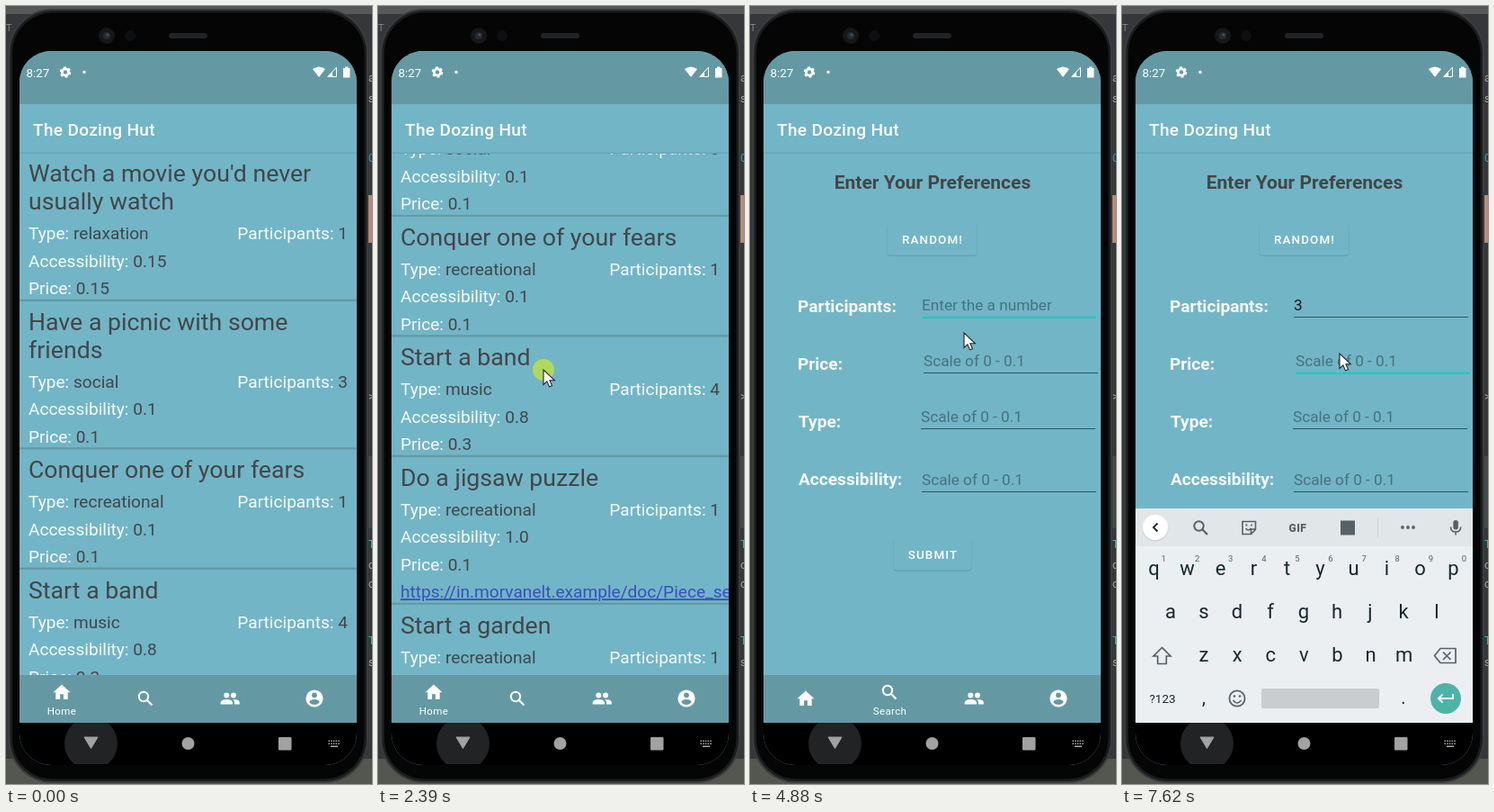
Recreate the animation shown at these times as an HTML page. Size 407 by 864 pixels, loop 8 s.

```html
<!DOCTYPE html>
<html lang="en">
<head>
<meta charset="utf-8">
<title>Activity app demo</title>
<style>
  html, body { margin: 0; width: 100%; height: 100%; overflow: hidden; background: #303234; }
  svg { display: block; width: 100vw; height: 100vh; font-family: Roboto, sans-serif; }
  text { white-space: pre; }
</style>
</head>
<body>
<svg id="stage" viewBox="0 0 407 864"></svg>
<script>
const LOOP = 8000, FPS = 15;
const BLUE = '#72b5c6', BAR = '#6499a3', DARK = '#434648', KEY = '#17272e', GREY = '#566268';

// Markup helpers
const text = (x, y, size, fill, str, attrs = '') =>
  `<text x="${x}" y="${y}" font-size="${size}" fill="${fill}" ${attrs}>${str}</text>`;
const rect = (x, y, w, h, fill, attrs = '') =>
  `<rect x="${x}" y="${y}" width="${w}" height="${h}" fill="${fill}" ${attrs}/>`;
const circle = (x, y, r, fill, attrs = '') =>
  `<circle cx="${x}" cy="${y}" r="${r}" fill="${fill}" ${attrs}/>`;
const path = (d, fill, attrs = '') => `<path d="${d}" fill="${fill}" ${attrs}/>`;
const line = (d, color, width = 1.6) => path(d, 'none', `stroke="${color}" stroke-width="${width}"`);
const group = (id, body, attrs = '') => `<g id="${id}" ${attrs}>${body}</g>`;
const MID = 'text-anchor="middle"';

function backdrop() {
  const scraps = [[84, 'a', '#aaa'], [107, 's', '#aaa'], [173, '0', '#3d9fb5'], [438, '&gt;', '#aaa'], [602, 'T', '#3fb8a4'],
    [625, 'c', '#aaa'], [646, 'c', '#aaa'], [709, 'T', '#3fb8a4'], [733, 's', '#aaa']];
  return rect(0, 0, 407, 864, '#35373a') + rect(0, 0, 407, 9, '#56585a') + rect(0, 836, 407, 28, '#54574f')
    + text(0, 28, 11, '#888', 'T') + rect(403, 210, 4, 53, '#b58a78') + rect(403, 500, 4, 80, '#45484a')
    + scraps.map(([y, s, color]) => text(403, y, 12, color, s)).join('')
    + rect(2.5, 3, 400.5, 860, '#3a3c3d', 'rx="49"')
    + rect(4.5, 5, 396.5, 856, '#1b1c1d', 'rx="47"')
    + rect(7, 7.5, 391.5, 851, '#050506', 'rx="45"')
    + circle(112, 33, 9, '#151719') + circle(112, 33, 4, '#252c34') + circle(113, 32, 1.5, '#46505a')
    + circle(138, 33, 6, '#0e0f11') + rect(181, 30, 43, 6, '#222324', 'rx="3"');
}

function statusBar() {
  return rect(15, 50, 375, 59, BAR) + text(22.5, 79, 13.4, '#fff', '8:27')
    + circle(66, 73.5, 3.6, 'none', 'stroke="#fff" stroke-width="2.8"')
    + circle(66, 73.5, 5.3, 'none', 'stroke="#fff" stroke-width="2" stroke-dasharray="2.8 2.75"')
    + circle(87, 73.5, 1.7, '#fff')
    + path('M341 70Q348 65 355 70L348 79Z', '#fff')
    + path('M358 78.5L367.5 68V78.5Z', 'none', 'stroke="#fff"') + path('M357 79L363 72.5V79Z', '#fff')
    + path('M375 69h2v-1.5h3.5V69h2v10.5H375Z', '#fff');
}

function appBar() {
  return rect(15, 109, 375, 54, BLUE) + rect(15, 162.5, 375, 1.6, '#68a7b6')
    + text(30, 144, 19.1, '#fff', 'The Dozing Hut', 'font-weight="500" letter-spacing=".3"');
}

const activities = [
  { title: ["Watch a movie you'd never", 'usually watch'], type: 'relaxation', people: 1, access: '0.15', price: '0.15' },
  { title: ['Have a picnic with some', 'friends'], type: 'social', people: 3, access: '0.1', price: '0.1' },
  { title: ['Conquer one of your fears'], type: 'recreational', people: 1, access: '0.1', price: '0.1' },
  { title: ['Start a band'], type: 'music', people: 4, access: '0.8', price: '0.3' },
  { title: ['Do a jigsaw puzzle'], type: 'recreational', people: 1, access: '1.0', price: '0.1',
    link: 'https://in.morvanelt.example/doc/Piece_sets' },
  { title: ['Start a garden'], type: 'recreational', people: 1, access: '0.35', price: '0.3' },
];

function activityList() {
  const field = (label, value) => `${label}: <tspan fill="${DARK}">${value}</tspan>`;
  const row = (x, y, label, value, attrs) => text(x, y, 19.1, '#f7fbfc', field(label, value), attrs);
  let top = 162.4, out = '';
  for (const item of activities) {
    item.title.forEach((s, i) => out += text(25, top + 33 + 31 * i, 26.7, DARK, s));
    const y = top + 66 + 31 * (item.title.length - 1);
    out += row(25, y, 'Type', item.type) + row(380, y, 'Participants', item.people, 'text-anchor="end"')
      + row(25, y + 30.5, 'Accessibility', item.access) + row(25, y + 61, 'Price', item.price);
    if (item.link) out += text(25, y + 91.5, 19.1, '#3a4fc0', item.link, 'text-decoration="underline"');
    top = y + 67.4 + (item.link ? 30.5 : 0);
    out += rect(15, top - 1, 375, 2.2, '#6299a5');
  }
  return out;
}

function searchPage() {
  const button = (x, y, w, label) =>
    rect(x - .5, y + .5, w + 1, 36.5, '#65a5b5', 'rx="4"') + rect(x, y, w, 35.5, BLUE, 'rx="3.5"')
    + text(x + w / 2 + .5, y + 22.5, 13.4, '#fff', label, MID + ' font-weight="500" letter-spacing="1.15"');
  const fields = [['Participants:', 53, 340, 191, 346], ['Price:', 53, 404, 193, 408],
    ['Type:', 54, 468, 190, 470], ['Accessibility:', 54, 532, 191, 540]];
  return rect(15, 164, 375, 579, BLUE)
    + text(203, 203, 21, DARK, 'Enter Your Preferences', MID + ' font-weight="700"')
    + button(153, 241, 99, 'RANDOM!') + button(160, 591, 86, 'SUBMIT')
    + fields.map(([label, x, y, fx, fy], i) =>
      text(x, y, 19.1, '#f7fbfc', label, 'font-weight="700"')
      + text(fx, fy - 8, 17.2, '#47727e', i ? 'Scale of 0 - 0.1' : 'Enter the a number', `id="hint${i}"`)
      + rect(fx, fy - 1, 194, 1, '#2d5661', `id="line${i}"`)).join('')
    + rect(193, 382, 2, 23, '#03c9bb', 'id="caret"');
}

function tabBar() {
  const label = (x, s) => text(x, 786.5, 11.5, '#fff', s, MID + ' letter-spacing=".35"');
  const person = (x, y) => circle(x, y - 4, 3, '#fff') + path(`M${x - 6.7} ${y + 6}v-2q1-3.4 6.7-3.4t6.7 3.4v2z`, '#fff');
  return rect(15, 743, 375, 53, BAR)
    + circle(156, 769.5, 53, '#000', 'id="ripple" clip-path="url(#tabs)"')
    + group('homeIcon', path('M60.1 770v-5.8h3.8v5.8h4.8v-7.7h2.8L62 753.5l-9.6 8.8h2.9v7.7z', '#fff'))
    + group('homeLabel', label(62, 'Home'))
    + group('searchIcon', circle(153, 767, 5.2, 'none', 'stroke="#fff" stroke-width="2"') + line('M156.7 770.7L162.5 776.5', '#fff', 2.2))
    + group('searchLabel', label(155.5, 'Search'))
    + person(245.3, 769.5) + circle(253, 765.5, 3, '#fff') + path('M253 770q6.6.4 6.8 3.4v2.1h-5.8v-2q0-2-1.8-3.4z', '#fff')
    + circle(343, 769, 9.6, '#fff') + circle(343, 765.3, 2.9, BAR) + path('M337.3 773q1-3 5.7-3t5.7 3q-2 3-5.7 3t-5.7-3z', BAR);
}

function keyboard() {
  const letters = (str, x, y, step = 37) => [...str].map((c, i) => text(x + i * step, y, 22, KEY, c, MID)).join('');
  const digits = [...'1234567890'].map((c, i) => text(46.5 + i * 37.1, 617, 9.5, GREY, c, MID)).join('');
  return rect(15, 558, 375, 240, '#ebeff2') + rect(15, 558, 375, 42, '#e1e6e9')
    + circle(37, 580, 14.5, '#cfd4d7') + circle(37, 579, 14, '#fff') + line('M39.5 574.5L35 579L39.5 583.5', KEY, 1.8)
    + circle(85.5, 577.5, 5.2, 'none', `stroke="${GREY}" stroke-width="2"`) + line('M89.3 581.3L95 587', GREY, 2.2)
    + line('M134 572.5h14.5v9l-5 5H134z M143.5 586v-5h5 M137.5 580q3 4 6 0', GREY)
    + circle(138.5, 576.5, 1.1, GREY) + circle(144, 576.5, 1.1, GREY)
    + text(195.5, 583.5, 12, GREY, 'GIF', MID + ' font-weight="900" letter-spacing=".5"')
    + rect(243, 571.5, 16, 16, GREY) + rect(284, 569, 1, 21, '#ccd2d5')
    + [312, 318, 324].map(x => circle(x, 579, 1.9, GREY)).join('')
    + rect(368.3, 571, 5.6, 10.5, GREY, 'rx="2.8"') + line('M365.5 578.5q0 5.5 5.6 5.5t5.6-5.5M371.1 584v3.5', GREY)
    + letters('qwertyuiop', 35.5, 632) + digits + letters('asdfghjkl', 54, 680) + letters('zxcvbnm', 91, 728, 37.1)
    + line('M44.5 712.5L35 722h4.7v8.5h9.6V722H54z', GREY, 1.7)
    + line('M354 713.5h17v16h-17l-6.5-8zM357 717.5l8.5 8.5m0-8.5l-8.5 8.5', GREY, 1.7)
    + text(45, 774, 13.5, KEY, '?123', MID) + text(91, 775, 20, KEY, ',', MID) + text(313, 775, 20, KEY, '.', MID)
    + circle(128, 769, 8.6, 'none', `stroke="${GREY}" stroke-width="1.8"`)
    + circle(125, 766.5, 1.3, GREY) + circle(131, 766.5, 1.3, GREY) + line('M123.5 771q4.5 6 9 0', GREY)
    + rect(155, 758, 131, 22, '#c9cdd0', 'rx="2"')
    + circle(360, 769, 17, '#4db3a8') + line('M368 764v5h-16m4.5-4.5L352 769l4.5 4.5', '#fff', 1.9);
}

function navBar() {
  const dots = [0, 1, 2, 3, 4].map(i =>
    rect(358.5 + i * 2.7, 815.5, 1.5, 1.5, '#aaa') + rect(358.5 + i * 2.7, 818.5, 1.5, 1.5, '#aaa')).join('');
  return rect(15, 796, 375, 47, '#000') + circle(94.5, 819, 29.5, '#222324', 'clip-path="url(#nav)"')
    + path('M87 812h15l-7.5 12.5z', '#a2a2a2', 'stroke="#a2a2a2" stroke-linejoin="round"')
    + circle(202.5, 819, 7, '#a2a2a2') + rect(303, 812, 14.5, 14.5, '#a2a2a2', 'rx="1"')
    + dots + rect(361, 821.5, 8, 1.5, '#aaa');
}

const clip = (id, ...box) => `<clipPath id="${id}">${rect(...box)}</clipPath>`;

document.getElementById('stage').innerHTML =
  clip('screen', 15, 50, 375, 793, '#000', 'rx="35"') + clip('tabs', 15, 743, 375, 53) + clip('nav', 15, 796, 375, 46)
  + backdrop()
  + group('display', rect(15, 50, 375, 793, BLUE) + group('list', activityList()) + group('search', searchPage())
    + statusBar() + appBar() + tabBar() + group('keys', keyboard()) + navBar(), 'clip-path="url(#screen)"')
  + group('pointer', circle(0, 0, 12, '#b9dd50', 'id="press" opacity=".88"')
    + path('M0 0v16.5l3.9-3.6 2.6 6 3-1.3-2.6-5.9h5.4z', '#fff', 'stroke="#222" stroke-width="1.1"'));

const $ = id => document.getElementById(id);
const clamp = v => Math.max(0, Math.min(1, v));
const ramp = (t, from, to) => clamp((t - from) / (to - from));
const between = (t, ...spans) => spans.some(([a, b]) => t >= a && t < b);
const show = (id, on) => $(id).style.display = on ? '' : 'none';
const shift = (id, x, y) => $(id).setAttribute('transform', `translate(${x} ${y})`);

// Linear track through [tick, ...values] stops
function track(stops, t) {
  const i = stops.findIndex(s => s[0] > t);
  if (i < 0) return stops.at(-1).slice(1);
  if (i === 0) return stops[0].slice(1);
  const a = stops[i - 1], b = stops[i], k = ramp(t, a[0], b[0]);
  return a.slice(1).map((v, j) => v + (b[j + 1] - v) * k);
}

// All times below are in ticks of 1 / FPS seconds
const pointerPath = [[7, 278, 862], [18, 117, 664], [19, 119, 645], [22, 142, 430], [25, 163, 328],
  [30, 163, 328], [36, 184, 404], [41, 226, 655], [50, 160, 774], [52, 160, 774], [54, 178, 715],
  [65, 234, 335], [68, 234, 335], [72, 238, 363], [82, 238, 363], [85, 242, 386]];
const scrollPath = [[18, 0], [22, 133.2], [25, 278], [29, 278], [30, 275.8], [36, 258.3], [41, 0]];

function focusLine(i, y, focused) {
  const el = $('line' + i);
  el.setAttribute('fill', focused ? '#03d2c3' : '#2d5661');
  el.setAttribute('height', focused ? 2 : 1);
}

function draw(t) {
  const onSearch = t >= 54;
  show('list', !onSearch);
  show('search', onSearch);
  shift('list', 0, -track(scrollPath, t)[0]);

  show('pointer', t >= 7);
  shift('pointer', ...track(pointerPath, t));
  show('press', between(t, [18, 41], [50, 52], [66, 68], [87, 90]));

  $('ripple').setAttribute('r', 20 + 33 * ramp(t, 51, 54));
  $('ripple').setAttribute('opacity', t < 51 ? 0 : .15 * (1 - ramp(t, 54, 59)));
  const swap = ramp(t, 54, 56);
  shift('homeIcon', 0, 7 * swap);
  shift('searchIcon', 0, -7 * swap);
  $('homeLabel').setAttribute('opacity', 1 - swap);
  $('searchLabel').setAttribute('opacity', swap);

  const typed = t >= 83;
  $('hint0').textContent = typed ? '3' : 'Enter the a number';
  $('hint0').setAttribute('fill', typed ? '#101416' : '#47727e');
  focusLine(0, 346, between(t, [67, 90]));
  focusLine(1, 408, t >= 90);
  show('caret', between(t, [92, 99], [107, 114]));

  const rise = ramp(t, 73, 79);
  show('keys', rise > 0);
  shift('keys', 0, 240 * (1 - rise) ** 3);
}

function tick(now) {
  draw(Math.floor((now % LOOP + 20) * FPS / 1000));
  requestAnimationFrame(tick);
}
requestAnimationFrame(tick);
</script>
</body>
</html>
```
